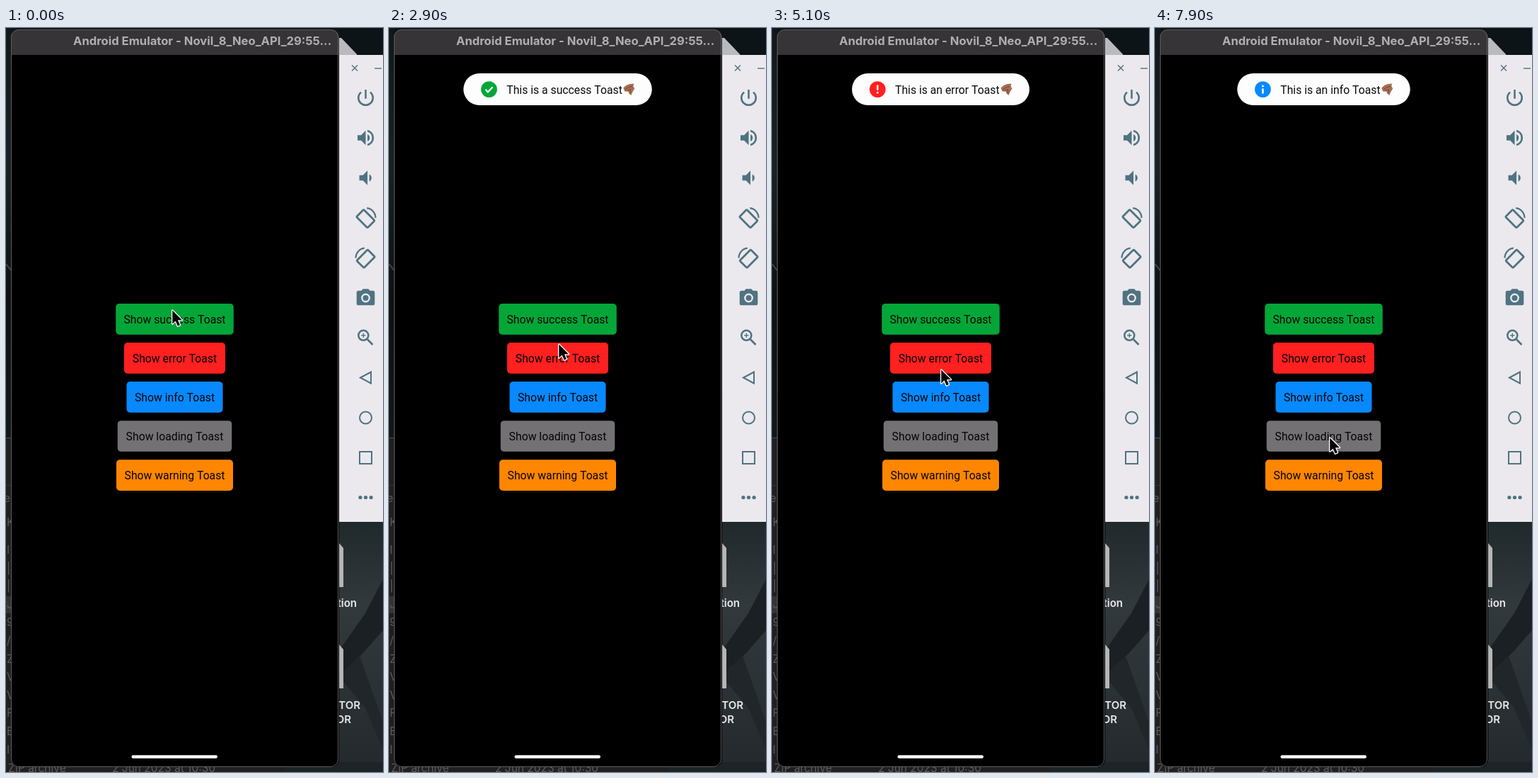
These frames come from a looping animation (533 px wide and 1050 px high, 8000 ms). An HTML page with a canvas:

```html
<!DOCTYPE html>
<html lang="en">
<head>
<meta charset="utf-8">
<title>Toast demo</title>
<style>
  html, body { margin: 0; width: 100%; height: 100%; overflow: hidden; background: #000; }
  canvas { display: block; width: 533px; height: 1050px; }
</style>
</head>
<body>
<canvas id="stage"></canvas>
<script>
const W = 533, H = 1050, LOOP = 8000;
const MID = 238.5;
const canvas = document.getElementById('stage');
const ctx = canvas.getContext('2d');
const dpr = window.devicePixelRatio || 1;
canvas.width = W * dpr;
canvas.height = H * dpr;

const GREEN = '#04a638', RED = '#ff2020', BLUE = '#0889ff';
const APP_FONT = '15.75px Roboto, sans-serif';
const ICON = '#4f7382';

const buttons = [
  ['Show success Toast', GREEN, 166.5],
  ['Show error Toast', RED, 143],
  ['Show info Toast', BLUE, 136],
  ['Show loading Toast', '#747175', 161.5],
  ['Show warning Toast', '#ff8600', 165],
];

const toasts = [
  { start: 2006, text: 'This is a success Toast', color: GREEN, width: 266.5, mark: drawCheck },
  { start: 4710, text: 'This is an error Toast', color: RED, width: 251, mark: () => drawBang(1) },
  { start: 7024, text: 'This is an info Toast', color: BLUE, width: 244.5, mark: () => drawBang(-1) },
];
const TOAST_LIFE = 1100, SLIDE = 300, HIDDEN_Y = -10, SHOWN_Y = 64;

// time, x, y of the pointer tip
const pointerPath = [
  [0, 234, 397], [1500, 234, 397], [2000, 232.5, 402.5], [2350, 232.5, 402.5],
  [2900, 239, 445], [3500, 238, 462], [4850, 238, 462], [5500, 238, 519],
  [7250, 238, 519], [7800, 246, 577], [8000, 246, 577],
];

const clamp = v => Math.min(1, Math.max(0, v));
const smooth = v => v * v * (3 - 2 * v);

function fillRect(x, y, w, h, color) {
  ctx.fillStyle = color;
  ctx.fillRect(x, y, w, h);
}

function roundRect(x, y, w, h, r) {
  ctx.beginPath();
  ctx.roundRect(x, y, w, h, r);
}

function fillRound(x, y, w, h, r, color) {
  roundRect(x, y, w, h, r);
  ctx.fillStyle = color;
  ctx.fill();
}

function disc(x, y, r, color) {
  ctx.beginPath();
  ctx.arc(x, y, r, 0, Math.PI * 2);
  ctx.fillStyle = color;
  ctx.fill();
}

function trace(points, close) {
  ctx.beginPath();
  points.forEach(([x, y]) => ctx.lineTo(x, y));
  if (close) ctx.closePath();
}

function shape(points, color) {
  trace(points, true);
  ctx.fillStyle = color;
  ctx.fill();
}

function line(points, color, width) {
  trace(points);
  ctx.strokeStyle = color;
  ctx.lineWidth = width;
  ctx.stroke();
}

function text(str, x, y, font, color, align = 'left') {
  ctx.font = font;
  ctx.fillStyle = color;
  ctx.textAlign = align;
  ctx.fillText(str, x, y);
}

function at(x, y, scale, draw) {
  ctx.save();
  ctx.translate(x, y);
  ctx.scale(scale, scale);
  draw();
  ctx.restore();
}

function gradient(y0, y1, ...colors) {
  const g = ctx.createLinearGradient(0, y0, 0, y1);
  colors.forEach((c, i) => g.addColorStop(i / (colors.length - 1), c));
  return g;
}

function drawDesktop() {
  fillRect(0, 0, W, H, '#0d1418');
  fillRect(0, 0, 8, 578, gradient(0, 578, '#10181c', '#182226', '#0c1114', '#11181b'));
  line([[0, 333], [4, 338], [7, 342]], '#41494c', 2);

  // file list behind the phone window
  fillRect(0, 578, 393, 472, '#202021');
  fillRect(0, 578, 8, 1, '#4b4d4e');
  fillRect(0, 645, 8, 1, '#343435');
  fillRect(0, 802, 8, 24, '#343435');
  const dim = '#5c5c5c', font = '15.5px Inter, sans-serif';
  text('e', -3, 669, font, dim);
  [...'KI||J9/ZVVFEI'].forEach((c, i) => {
    const y = i ? 742 + (i - 1) * 25.6 : 703;
    text(c, 1, y, font, dim);
  });
  text('ZIP archive', 3, 1050, font, dim);
  text('2 Jun 2023 at 10:30', 150, 1050, font, dim);

  // wallpaper below the tool panel
  fillRect(393, 697, 140, 353, gradient(697, 1050, '#20292c', '#32393c', '#2b3235', '#23292c'));
  shape([[533, 778], [533, 850], [505, 882], [470, 914], [470, 880], [508, 826]], '#1a2023');
  shape([[470, 914], [500, 886], [533, 980], [533, 1018], [508, 960]], '#202629');
  fillRect(393, 1036, 140, 14, '#1d2326');

  // desktop documents
  shape([[470, 14], [474, 14], [496, 37], [496, 38], [470, 38]], '#b9babb');
  for (const y of [727, 870]) {
    shape([[465, y], [471, y], [477, y + 7], [477, y + 62], [465, y + 62]], '#b4b5b5');
  }
  const label = '600 15px Inter, sans-serif';
  text('tion', 496, 816.5, label, '#e9e9e9', 'right');
  text('TOR', 501, 960.5, label, '#e9e9e9', 'right');
  text('OR', 488, 980.5, label, '#e9e9e9', 'right');
}

const glyphs = {
  power: 'M13 3h-2v10h2zM17.8 5.2l-1.4 1.4C18 7.9 19 9.8 19 12a7 7 0 0 1-14 0c0-2.2 1-4.1 2.6-5.4L6.2 5.2A9 9 0 1 0 17.8 5.2z',
  loud: 'M3 9v6h4l5 5V4L7 9zM16.5 12A4.5 4.5 0 0 0 14 8v8a4.5 4.5 0 0 0 2.5-4zM14 3.2v2.1a7 7 0 0 1 0 13.4v2.1a9 9 0 0 0 0-17.6z',
  quiet: 'M18.5 12A4.5 4.5 0 0 0 16 8v8a4.5 4.5 0 0 0 2.5-4zM5 9v6h4l5 5V4L9 9z',
  camera: 'M9 2L7.2 4H4a2 2 0 0 0-2 2v12a2 2 0 0 0 2 2h16a2 2 0 0 0 2-2V6a2 2 0 0 0-2-2h-3.2L15 2zM12 17a5 5 0 0 1 0-10a5 5 0 0 1 0 10z',
};

function glyph(name, y) {
  at(508.5, y, 1.28, () => {
    ctx.translate(-12, -12);
    ctx.fillStyle = ICON;
    ctx.fill(new Path2D(glyphs[name]), 'evenodd');
  });
}

function rotateIcon(y, flip) {
  ctx.save();
  ctx.translate(508.5, y);
  ctx.scale(flip, 1);
  ctx.strokeStyle = ICON;
  ctx.lineWidth = 2.2;
  ctx.beginPath();
  ctx.arc(0, 0, 14, -1.45, 0);
  ctx.stroke();
  ctx.translate(0, 1);
  ctx.rotate(Math.PI / 4);
  roundRect(-11, -7, 22, 14.5, 1.5);
  ctx.lineWidth = 2.8;
  ctx.stroke();
  ctx.restore();
}

function drawPanel() {
  fillRect(470, 38, 63, 659, '#ebe9ed');
  line([[489, 52.5], [497, 60.5]], ICON, 1.4);
  line([[497, 52.5], [489, 60.5]], ICON, 1.4);
  line([[521, 57], [531, 57]], ICON, 1.4);
  glyph('power', 98.5);
  glyph('loud', 155);
  glyph('quiet', 211.5);
  rotateIcon(268, 1);
  rotateIcon(324.5, -1);
  glyph('camera', 381);
  disc(508.5, 381, 4, ICON);

  at(508.5, 437, 1.28, () => {
    ctx.strokeStyle = ICON;
    ctx.lineWidth = 2;
    ctx.beginPath();
    ctx.arc(-2.5, -2.5, 5.5, 0, Math.PI * 2);
    ctx.stroke();
    line([[2, 2], [7.8, 7.8]], ICON, 2.1);
    line([[-5, -2.5], [0, -2.5]], ICON, 1.1);
    line([[-2.5, -5], [-2.5, 0]], ICON, 1.1);
  });

  ctx.strokeStyle = ICON;
  ctx.lineWidth = 2;
  trace([[501, 493.5], [516, 485.5], [516, 501.5]], true);
  ctx.stroke();
  ctx.beginPath();
  ctx.arc(508.5, 550, 8.5, 0, Math.PI * 2);
  ctx.stroke();
  ctx.strokeRect(500, 598, 17, 17);
  for (let i = -1; i < 2; i++) disc(508.5 + i * 7.6, 662.5, 2.6, ICON);
}

function drawPhone() {
  roundRect(7, 2, 464, 1041, 11);
  ctx.fillStyle = '#000';
  ctx.fill();
  ctx.save();
  ctx.clip();
  fillRect(7, 2, 464, 36, '#363437');
  ctx.restore();
  roundRect(7.5, 2.5, 462, 1040, 10.5);
  ctx.strokeStyle = '#5d5d5f';
  ctx.lineWidth = 1;
  ctx.stroke();
  text('Android Emulator - Novil_8_Neo_API_29:55...', 95, 24.3,
    'bold 16.6px Inter, sans-serif', '#b0aeb0');

  buttons.forEach(([label, color, width], i) => {
    const y = 389 + i * 55.05;
    fillRound(MID - width / 2, y, width, 43.7, 5, color);
    text(label, MID, y + 27.7, APP_FONT, '#050505', 'center');
  });
  fillRound(177.5, 1026.3, 121.5, 4.4, 2.2, '#f7f7f7');
}

function drawCheck() {
  line([[-5, 0.3], [-1.6, 3.7], [5.2, -3.3]], '#fff', 2.3);
}

// dir 1 is an exclamation mark, -1 the letter i
function drawBang(dir) {
  fillRect(-1.25, dir > 0 ? -6 : -1.2, 2.5, 7.2, '#fff');
  fillRect(-1.25, dir * 4.6 - 1.25, 2.5, 2.5, '#fff');
}

function drawHand() {
  shape([[-8, -2], [-4, -5.5], [1, -7.5], [7, -8], [6, -4.5], [8, -1], [5.5, 3],
    [3, 8.5], [0, 6], [-1, 3], [-6, 3]], '#a66f54');
  line([[-5, 0], [0, -3], [5, -4.5]], '#71452f', 1);
  line([[-3, 2], [2, 0], [2, 5]], '#71452f', 1);
}

function drawToast(toast, t) {
  const age = t - toast.start;
  if (age < 0 || age > TOAST_LIFE + SLIDE) return;
  const enter = 1 - (1 - clamp(age / SLIDE)) ** 3;
  const leave = clamp((age - TOAST_LIFE) / SLIDE) ** 3;
  const y = HIDDEN_Y + (SHOWN_Y - HIDDEN_Y) * (enter - leave);
  const x = MID - toast.width / 2;

  ctx.save();
  ctx.beginPath();
  ctx.rect(8, 38, 461, 300);
  ctx.clip();
  fillRound(x, y, toast.width, 45, 22.5, '#fefdfe');
  disc(x + 36.2, y + 22.6, 11.4, toast.color);
  at(x + 36.2, y + 22.6, 1, toast.mark);
  text(toast.text, x + 61, y + 28.8, APP_FONT, '#0a0a0a');
  at(x + toast.width - 32.5, y + 22.6, 1, drawHand);
  ctx.restore();
}

function drawPointer(t) {
  const i = pointerPath.findIndex(p => p[0] > t);
  const [t0, x0, y0] = pointerPath[i - 1];
  const [t1, x1, y1] = pointerPath[i];
  const k = smooth((t - t0) / (t1 - t0));
  at(x0 + (x1 - x0) * k + 0.7, y0 + (y1 - y0) * k + 1, 1.15, () => {
    trace([[0.5, 0.5], [0.5, 17], [4.3, 13.4], [7, 19.6], [9.8, 18.4], [7.2, 12.3], [12.4, 12.3]], true);
    ctx.strokeStyle = '#fff';
    ctx.lineWidth = 2.3;
    ctx.lineJoin = 'round';
    ctx.stroke();
    ctx.fillStyle = '#000';
    ctx.fill();
    ctx.lineJoin = 'miter';
  });
}

function render(t) {
  ctx.setTransform(dpr, 0, 0, dpr, 0, 0);
  drawDesktop();
  drawPanel();
  drawPhone();
  toasts.forEach(toast => drawToast(toast, t));
  drawPointer(t);
}

const origin = performance.now();
function tick() {
  render((performance.now() - origin) % LOOP);
  requestAnimationFrame(tick);
}
tick();
</script>
</body>
</html>
```
